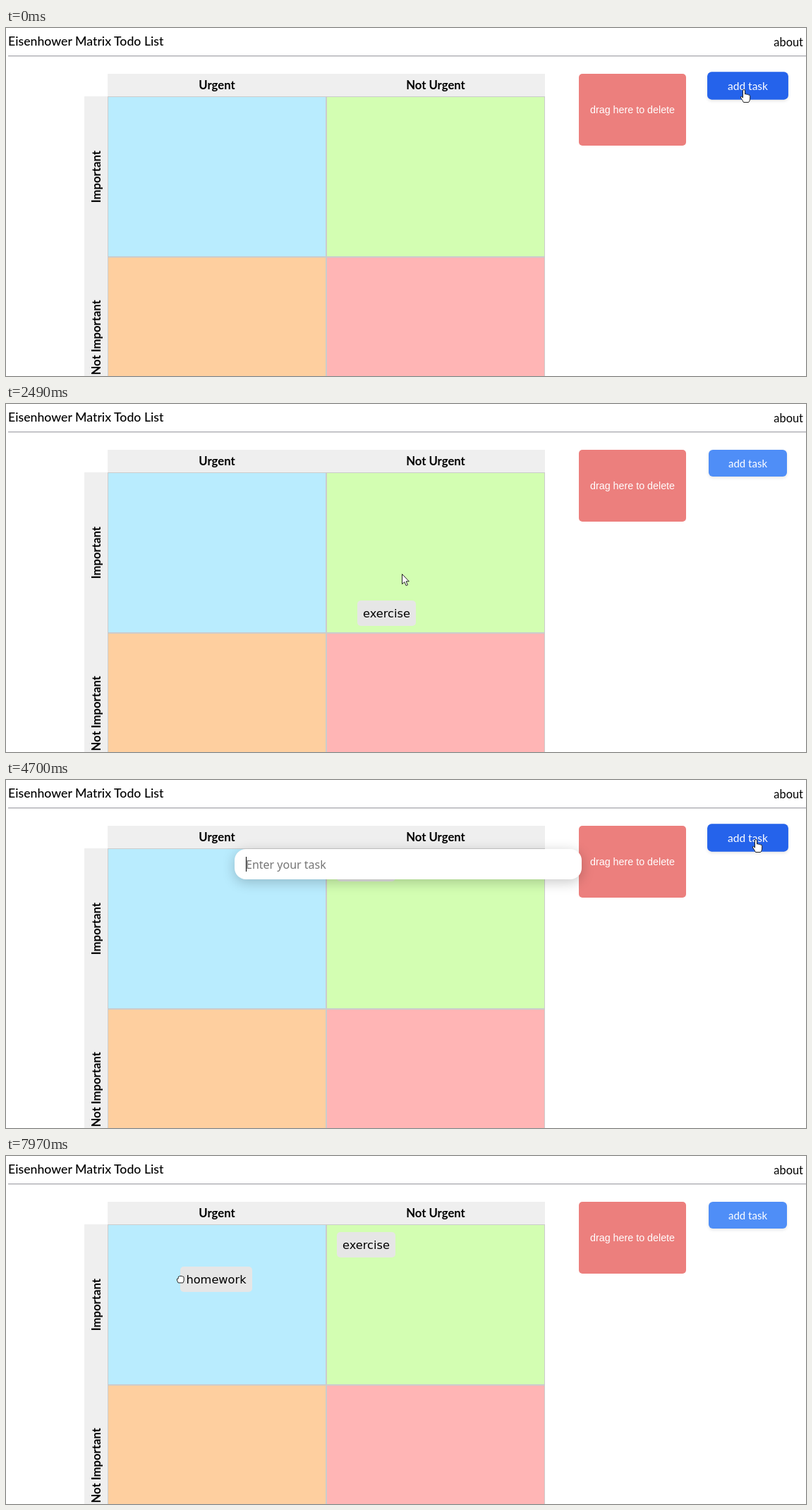
Write an HTML page that moves like this. It is 1134x494 px and loops after 8 s.

```html
<!DOCTYPE html>
<html lang="en">
<head>
<meta charset="utf-8">
<title>Eisenhower Matrix Todo List</title>
<style>
  html, body { margin: 0; width: 100%; height: 100%; overflow: hidden; background: #fff; }
  body { position: relative; font-family: Lato, sans-serif; color: #000; }
  body *, svg { box-sizing: border-box; }
  #stage { position: absolute; left: 0; top: 0; width: 1134px; height: 494px; overflow: hidden; }
  #stage > * { position: absolute; white-space: nowrap; }
  .mid { display: flex; align-items: center; justify-content: center; }
  #title { left: 3px; top: 8px; font-size: 17.7px; line-height: 22px; font-weight: 500; }
  #about { right: 4px; top: 9px; font-size: 16.4px; line-height: 22px; }
  #rule { left: 3px; top: 39px; width: 1131px; height: 1px; background: #a9a9b0; box-shadow: 0 1px #e4e4e4; }
  .head { background: #efefef; font-weight: 700; font-size: 16.7px; }
  .col { top: 65px; width: 310px; height: 32px; }
  .row { left: 111px; width: 33px; height: 228px; }
  .row span { writing-mode: vertical-rl; transform: rotate(180deg); }
  .cell { width: 310px; height: 228px; border: 1px solid #ccc; }
  #bin { left: 812px; top: 65px; width: 152px; height: 102px; border-radius: 5px; background: #ec7f7d;
    color: #fff; font: 14.3px "Liberation Sans", Arial, sans-serif; }
  #add { left: 996px; top: 65px; width: 111px; height: 38px; border-radius: 6px; background: #4f8ef7;
    color: #fff; font-size: 15px; box-shadow: 0 2px 4px rgba(0,0,0,.1); }
  #add.hover { background: #2563eb; transform: translateY(-2px) scale(1.035); }
  .task { left: 0; top: 0; height: 36px; border-radius: 5px; background: #e6e6e6;
    font: 16.2px "DejaVu Sans", sans-serif; }
  #modal { left: 324px; top: 98px; width: 492px; height: 43px; padding-left: 16px; border-radius: 16px;
    background: #fff; font: 16px "Noto Sans", sans-serif; display: flex; align-items: center;
    box-shadow: 0 5px 18px rgba(0,0,0,.36); }
  #modal.opening { box-shadow: 0 4px 18px rgba(0,0,0,.22); }
  #caret { width: 1px; height: 21px; margin-right: -1px; background: #000; }
  #hint { color: #757575; }
  #cursor { left: 0; top: 0; width: 1px; height: 1px; overflow: visible; }
  #cursor path { fill: #fff; stroke: #222; stroke-width: 1; stroke-linejoin: round; }
</style>
</head>
<body>
<div id="stage">
  <div id="title">Eisenhower Matrix Todo List</div>
  <div id="about">about</div>
  <div id="rule"></div>
  <div class="head col mid" style="left:144px">Urgent</div>
  <div class="head col mid" style="left:454px">Not Urgent</div>
  <div class="head row mid" style="top:97px"><span>Important</span></div>
  <div class="head row mid" style="top:325px"><span>Not Important</span></div>
  <div class="cell" style="left:144px;top:97px;background:#b9ecfe"></div>
  <div class="cell" style="left:454px;top:97px;background:#d3feb2"></div>
  <div class="cell" style="left:144px;top:325px;background:#fecf9f"></div>
  <div class="cell" style="left:454px;top:325px;background:#ffb5b5"></div>
  <div id="bin" class="mid">drag here to delete</div>
  <div id="add" class="mid">add task</div>
  <div id="exercise" class="task mid" style="width:83px">exercise</div>
  <div id="homework" class="task mid" style="width:102px">homework</div>
  <div id="modal"><span id="typed"></span><i id="caret"></i><span id="hint">Enter your task</span></div>
  <svg id="cursor">
    <path id="arrow" d="M.5.5V14.6L3.8 11.6 6.2 16.8 8.4 15.8 6.1 10.8H10.3Z"/>
    <path id="hand" d="M-1.5 11V1a1.5 1.5 0 0 1 3 0V6q1.5-1 2.7.4 1.6-.7 2.5.6 2-.3 2 1.6V12q0 3-2 5.5H-.5q-1.5-3-4-6.5-.5-2 1.2-1.7Z"/>
    <path id="grab" d="M-3.8 5q-2-3-1.9-5 .5-1.5 1.9-.8V-2.5q0-2 1.6-1.6 1-1.4 2.2-.2 1.4-.8 2.2.4 2.2-.2 2 1.8V1q0 2-1.4 4Z"/>
  </svg>
</div>
<script>
const LOOP = 8000, TICK = 88.6;
const $ = id => document.getElementById(id);
const show = (el, on) => { el.style.display = on ? '' : 'none'; };
const move = (el, x, y) => { el.style.transform = `translate(${Math.round(x)}px,${Math.round(y)}px)`; };
const inside = (p, x, y, w, h) => p && p.x >= x && p.x < x + w && p.y >= y && p.y < y + h;

// Visible stretches of the pointer: [tick, x, y]
const paths = [
  [[0, 1046, 88], [1, 1046, 88], [2, 1020, 99], [4, 790, 180], [5, 660, 214], [6, 617, 222]],
  [[26, 617, 223], [28, 561, 241], [31, 547, 290], [33, 544, 297], [34, 542, 296], [35, 537, 243],
   [36, 528, 172], [37, 522, 150], [39, 540, 152], [42, 680, 164], [44, 734, 165], [47, 985, 88],
   [49, 1123, 20], [50, 1080, 66], [51, 1063, 85], [53, 1063, 85], [54, 1030, 112], [56, 875, 265], [61, 854, 286]],
  [[77, 846, 291], [80, 690, 296], [83, 520, 298], [85, 499, 297], [86, 457, 263], [88, 338, 205], [90, 248, 175]]
];
// Settle on the last resting place before typing starts
paths[1].splice(-1, 0, [57, 854, 286]);

const entries = [
  { word: 'exercise', open: 1, close: 22, keys: [8, 10, 13, 14, 17, 19, 20, 21] },
  { word: 'homework', open: 53, close: 74, keys: [62, 64, 65, 66, 68, 69, 70, 71] }
];
const tasks = [
  { el: $('exercise'), w: 83, born: 22, grab: 33, drop: 38, dx: 46, home: [469, 108] },
  { el: $('homework'), w: 102, born: 74, grab: 85, drop: 99, dx: 1 }
];

function pointer(k) {
  const path = paths.find(p => k >= p[0][0] && k <= p[p.length - 1][0]);
  if (!path) return null;
  const i = Math.max(1, path.findIndex(p => p[0] >= k));
  const [a, b] = [path[i - 1], path[i]];
  const f = (k - a[0]) / (b[0] - a[0]);
  return { x: a[1] + (b[1] - a[1]) * f, y: a[2] + (b[2] - a[2]) * f };
}

function draw(k) {
  const p = pointer(k);
  let shape = 'arrow';

  for (const t of tasks) {
    show(t.el, k >= t.born);
    if (k < t.born) continue;
    const held = k >= t.grab && k < t.drop;
    const [x, y] = held ? [p.x - t.dx, p.y - 18] : k >= t.drop ? t.home : [498, 279];
    move(t.el, x, y);
    if (held || inside(p, x, y, t.w, 36)) shape = 'grab';
  }

  const entry = entries.find(e => k >= e.open && k < e.close);
  show($('modal'), entry);
  if (entry) {
    const n = entry.keys.filter(key => key <= k).length;
    $('modal').className = k === entry.open ? 'opening' : '';
    $('typed').textContent = entry.word.slice(0, n);
    show($('hint'), n === 0);
    $('caret').style.opacity = k >= 59 && k < 62 ? 0 : 1;
  }

  const hover = inside(p, 996, 65, 111, 38);
  $('add').classList.toggle('hover', !!hover);
  if (hover || inside(p, 1088, 12, 46, 18)) shape = 'hand';

  show($('cursor'), p);
  if (p) {
    move($('cursor'), p.x, p.y);
    for (const id of ['arrow', 'hand', 'grab']) show($(id), id === shape);
  }
}

const start = performance.now();
let last = -1;
function loop(now) {
  const t = Math.max(0, now - start) % LOOP;
  const k = t < 100 ? 0 : Math.min(90, Math.floor((t + 6) / TICK));
  if (k !== last) draw(last = k);
  requestAnimationFrame(loop);
}
loop(start);
</script>
</body>
</html>
```
